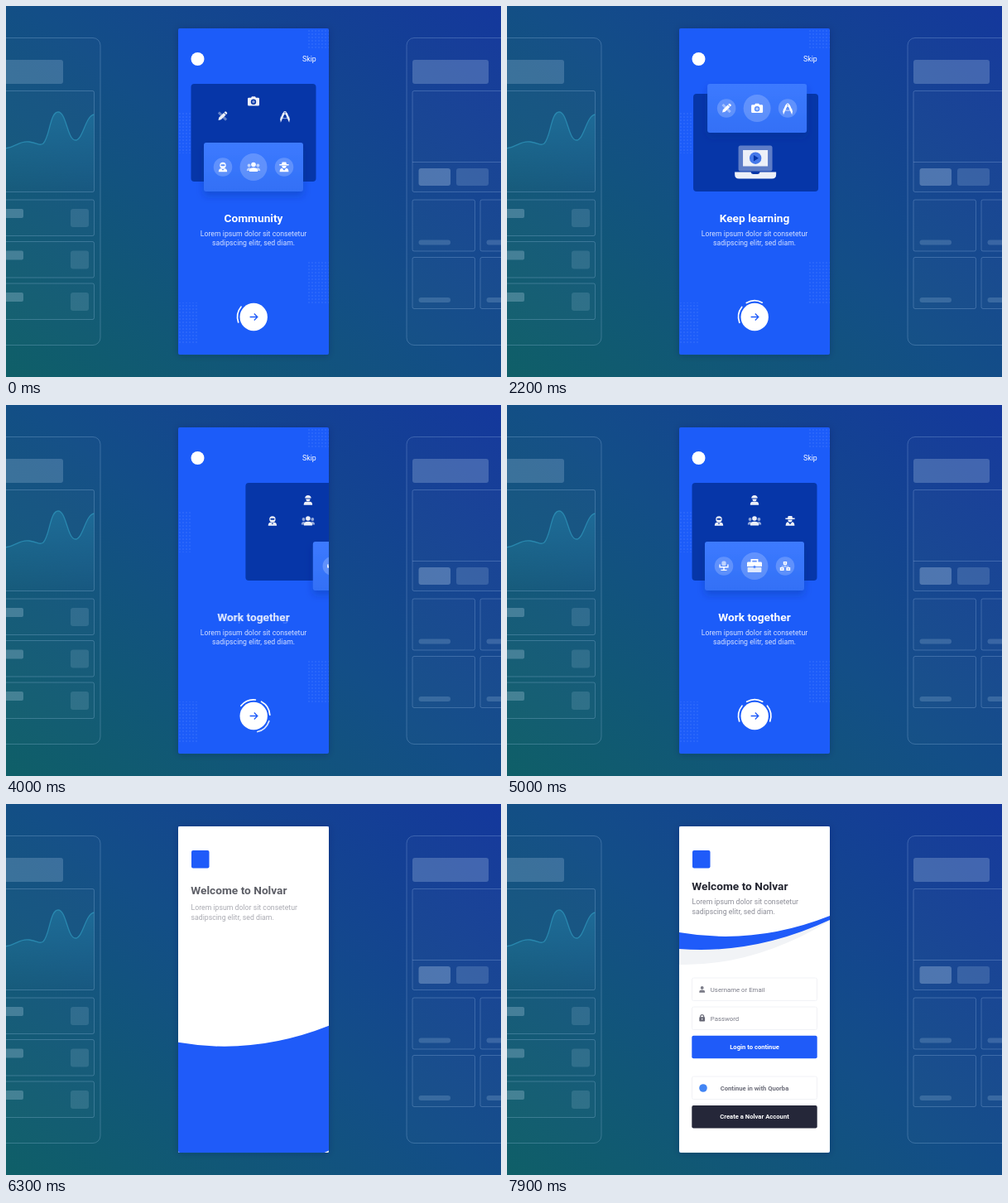
Write an HTML page that moves like this. It is 598 by 448 pixels and loops after 8000 ms.

```html
<!DOCTYPE html>
<html lang="en">
<head>
<meta charset="utf-8">
<title>Onboarding</title>
<style>
  html, body { margin: 0; width: 100%; height: 100%; overflow: hidden; background: #134f86; }
  svg { display: block; width: 598px; height: 448px; font-family: Roboto, sans-serif; }
  .h { font-size: 13.7px; font-weight: 700; }
  .p { font-size: 8.72px; }
  .f { font-size: 7.8px; fill: #7b7c88; }
  .b { font-size: 7.65px; font-weight: 700; }
  .mid { text-anchor: middle; }
  .wire { fill: rgba(255,255,255,.012); stroke: rgba(190,220,255,.23); }
</style>
</head>
<body>
<svg viewBox="0 0 598 448">
  <defs>
    <linearGradient id="bg" gradientUnits="userSpaceOnUse" x1="70" y1="500" x2="528" y2="-52">
      <stop offset="0" stop-color="#0f5f68"/>
      <stop offset=".5" stop-color="#134e87"/>
      <stop offset="1" stop-color="#14389c"/>
    </linearGradient>
    <linearGradient id="area" x1="0" y1="0" x2="0" y2="1">
      <stop offset="0" stop-color="#2ba0c4" stop-opacity=".3"/>
      <stop offset="1" stop-color="#2ba0c4" stop-opacity="0"/>
    </linearGradient>
    <linearGradient id="light" x1="0" y1="0" x2="0" y2="1">
      <stop offset="0" stop-color="#3c7aff"/>
      <stop offset="1" stop-color="#3370f6"/>
    </linearGradient>
    <pattern id="dots" width="4" height="4" patternUnits="userSpaceOnUse">
      <circle cx="2" cy="2" r=".8" fill="#7ea6ff" opacity=".3"/>
    </pattern>
    <filter id="shade" x="-20%" y="-30%" width="140%" height="180%">
      <feDropShadow dx="0" dy="5" stdDeviation="5" flood-color="#0a2c86" flood-opacity=".3"/>
    </filter>
    <filter id="soft" x="-10%" y="-5%" width="120%" height="110%">
      <feDropShadow dx="0" dy="1" stdDeviation="4" flood-color="#04204f" flood-opacity=".25"/>
    </filter>
    <clipPath id="phone"><rect x="208" y="27" width="182" height="394" rx="2"/></clipPath>

    <g id="person">
      <circle cy="-3" r="2.8"/><path d="M-5 5.5V4Q-5 .8 0 .8T5 4V5.5z"/>
    </g>
    <g id="group">
      <g opacity=".6">
        <circle cx="-5.4" cy="-2" r="1.9"/><circle cx="5.4" cy="-2" r="1.9"/>
        <path d="M-8.2 4.4Q-8.2 .8-4.4 .8L-4 4.4zM8.2 4.4Q8.2 .8 4.4 .8L4 4.4z"/>
      </g>
      <use href="#person"/>
    </g>
    <g id="ninja">
      <circle cy="-2" r="3.7"/><path d="M-5.2 5.8Q-5 1.6-2 1.8H2Q5 1.6 5.2 5.8z"/>
      <rect x="-2.5" y="-3.2" width="5" height="1.9" rx=".9" fill="currentColor"/>
      <path d="M-1.3 2.6L0 4.2L1.3 2.6z" fill="currentColor"/>
    </g>
    <g id="spy">
      <path d="M-3-3.4L-2.3-6H2.3L3-3.4H5.6V-2H-5.6V-3.4zM-2.7-1.6H2.7Q2.5 1.4 0 1.4T-2.7-1.6z"/>
      <path d="M-5.4 5.8Q-5.4 1.4-2.4 1.2L0 4.2L2.4 1.2Q5.4 1.4 5.4 5.8z"/>
    </g>
    <g id="worker">
      <path d="M-3.8-2.4Q-3.5-6 0-6T3.8-2.4zM-2.6-1.6H2.6Q2.4 1.3 0 1.3T-2.6-1.6z"/>
      <path d="M-5.2 5.8Q-5.2 2-2.4 1.8H2.4Q5.2 2 5.2 5.8z"/>
    </g>
    <g id="pencil">
      <rect x="-6.5" y="-1.5" width="13" height="3" rx=".6" transform="rotate(45)" opacity=".4"/>
      <path d="M-7 0L-4.3-1.8H4V1.8H-4.3zM4.7-1.8H5.8Q7-1.8 7-.6V.6Q7 1.8 5.8 1.8H4.7z" transform="rotate(-45)"/>
    </g>
    <g id="camera">
      <path d="M-5.6-4.2H-3L-2-5.8H2L3-4.2H5.6Q7-4.2 7-2.9V4.3Q7 5.6 5.6 5.6H-5.6Q-7 5.6-7 4.3V-2.9Q-7-4.2-5.6-4.2z"/>
      <circle cy=".7" r="3.2" fill="currentColor"/><circle cy=".7" r="1.7" opacity=".55"/>
    </g>
    <g id="compass">
      <circle cy="-4" r="2"/>
      <path d="M-.9-3.2L-4.9 5.8L-5.3 3.6L-2.3-3.4zM.9-3.2L4.9 5.8L5.3 3.6L2.3-3.4z" stroke="#fff" stroke-width="1.1"/>
      <path d="M-5.4 1Q0 4.6 5.4 1" fill="none" stroke="#fff" stroke-width="1.1" opacity=".6"/>
      <circle cy="-4" r=".8" fill="currentColor"/>
    </g>
    <g id="chair">
      <rect x="-2.6" y="-6" width="5.2" height="5.6" rx="1.6" opacity=".6"/>
      <path d="M-5.6-2H-4.2V.6H4.2V-2H5.6V2H-5.6zM-.7 2H.7V4.2H3.5V5.6H-3.5V4.2H-.7z"/>
    </g>
    <g id="case">
      <path d="M-3.6-4.6V-7.6H3.6V-4.6" fill="none" stroke="#fff" stroke-width="1.7"/>
      <path d="M-7.6-5H7.6Q9-5 9-3.6V.6H-9V-3.6Q-9-5-7.6-5z"/>
      <path d="M-8.4 1.5H8.4V6.4Q8.4 7.6 7.2 7.6H-7.2Q-8.4 7.6-8.4 6.4z" opacity=".8"/>
      <rect x="-1.4" y="-.4" width="2.8" height="2.8" rx=".6" fill="currentColor"/>
    </g>
    <g id="net">
      <path d="M0-2V1M-4 2V.4H4V2" fill="none" stroke="#fff" opacity=".6"/>
      <rect x="-2.2" y="-5.6" width="4.4" height="4" rx=".6"/>
      <rect x="-6.2" y="1.4" width="4.8" height="4.2" rx=".6"/>
      <rect x="1.4" y="1.4" width="4.8" height="4.2" rx=".6"/>
      <path d="M-.8-3.6H.8M-4.6 3.5H-3M3 3.5H4.6" stroke="currentColor"/>
    </g>
  </defs>

  <rect width="598" height="448" fill="url(#bg)"/>
  <g id="sides"></g>

  <rect x="208" y="27" width="182" height="394" rx="2" fill="#1f5bf9" filter="url(#soft)"/>
  <g clip-path="url(#phone)">
    <g id="intro">
      <path d="M365 27h25v25h-25zM207 128h17v50h-17zM365 308h25v52h-25zM207 358h26v50h-26z" fill="url(#dots)"/>
      <circle cx="231.5" cy="64" r="8" fill="#fff"/>
      <text x="374.8" y="67.2" text-anchor="end" font-size="8.8" fill="#fff">Skip</text>
      <g id="slides"></g>
      <g class="mid" fill="#fff">
        <g id="titles" class="h"></g>
        <g class="p" fill="#d5e0ff">
          <text x="299" y="277.5">Lorem ipsum dolor sit consetetur</text>
          <text x="299" y="289.3">sadipscing elitr, sed diam.</text>
        </g>
      </g>
      <g transform="translate(299.2 375.5)">
        <g id="ring" fill="none" stroke="#fff" stroke-width="1.7" stroke-linecap="round"></g>
        <circle r="16.7" fill="#fff"/>
        <path d="M-4.6 0H4.4M.6-4L4.6 0L.6 4" fill="none" stroke="#1f5bf9" stroke-width="1.3"/>
      </g>
      <circle id="ripple" cx="299.2" cy="375.5" fill="#fff"/>
    </g>

    <g id="login">
      <rect x="207" y="26" width="184" height="396" fill="#fff"/>
      <path id="grey" fill="#f1f3f6"/>
      <path id="blue" fill="#1f5bf9"/>
      <path id="white" fill="#fff"/>
      <g id="mark"><rect x="224" y="56" width="21.5" height="21.5" rx="2" fill="#1f5bf9"/></g>
      <g id="head"><text class="h" x="223.3" y="104.3" fill="#22242f">Welcome to Nolvar</text></g>
      <g id="sub" class="p" fill="#8c8d97">
        <text x="223.5" y="121.2">Lorem ipsum dolor sit consetetur</text>
        <text x="223.5" y="133">sadipscing elitr, sed diam.</text>
      </g>
      <g id="form"></g>
    </g>
  </g>
</svg>
<script>
const $ = id => document.getElementById(id);
const LOOP = 8000, STEP = 100;

// ---- side wireframes
const box = (x, y, w, h, r = 2) => `<rect class="wire" x="${x}" y="${y}" width="${w}" height="${h}" rx="${r}"/>`;
const bar = (x, y, w, h, a, r = 3) => `<rect x="${x}" y="${y}" width="${w}" height="${h}" rx="${r}" fill="#c4dcf2" opacity="${a}"/>`;
const curve = 'M-2 172C12 171 16 162 28 164S40 169 45 166C53 158 53 128 63 128S74 162 84 162C93 162 96 132 106.5 131';
let sides = box(-20, 38.5, 134, 371, 9) + bar(-10, 65, 79, 29, .22) + box(-10, 102.5, 116.5, 122) +
  `<path d="${curve}V224H-2z" fill="url(#area)"/><path d="${curve}" fill="none" stroke="#2c8fb5" stroke-width="1.3" opacity=".85"/>`;
for (const y of [234, 284.5, 335])
  sides += box(-10, y, 116.5, 43.5) + bar(-10, y + 11, 31, 11, .27, 2) + bar(78, y + 11, 22, 22, .15);
sides += box(484, 38.5, 140, 371, 9) + bar(491, 65, 92, 29, .25) + box(491, 102.5, 130, 122) +
  '<path class="wire" d="M491 188.5H600"/>' + bar(498.5, 196, 38.5, 21, .31) + bar(544, 196, 39, 21, .18);
for (const y of [234, 303.5])
  for (const x of [491, 573])
    sides += box(x, y, 75.5, 62) + bar(x + 7.5, y + 48.5, 38.5, 6, .19);
$('sides').innerHTML = sides;

// ---- slides
const icon = (name, x, y, s = 1) => `<use href="#${name}" transform="translate(${x} ${y}) scale(${s})"/>`;
const darkCard = (y, inner) => `<g class="dark" fill="#fff" color="#0636a8">
  <rect x="223.5" y="${y}" width="151" height="118" rx="4" fill="#0636a8"/><g opacity=".93">${inner}</g></g>`;
const lightCard = (y, names) => `<g class="lit" fill="#fff" color="#5a8efc">
  <rect x="239" y="${y}" width="120" height="59" rx="3" fill="url(#light)" filter="url(#shade)"/>` +
  names.map((n, i) => `<circle cx="${262 + 37 * i}" cy="${y + 29.5}" r="${i == 1 ? 16.5 : 11.3}" opacity=".2"/>` +
    icon(n, 262 + 37 * i, y + 29.5)).join('') + '</g>';
const laptop = `<rect x="278" y="168.5" width="41" height="31" rx="2.5" opacity=".38"/>
  <rect x="283.5" y="174" width="30" height="19.5"/><circle cx="298.6" cy="183.7" r="7.2" fill="#4a7dee"/>
  <path d="M296.4 180L302.4 183.7L296.4 187.4z" fill="#0636a8"/>
  <path d="M273.6 200.5H293Q293.6 203 296 203H301Q303.4 203 304 200.5H323.6V203.5Q323.6 208.5 318.6 208.5H278.6Q273.6 208.5 273.6 203.5z"/>`;
const slides = [
  ['Community',
    darkCard(94, icon('pencil', 261.5, 133) + icon('camera', 299, 115) + icon('compass', 337, 133)) +
    lightCard(165, ['ninja', 'group', 'spy'])],
  ['Keep learning', darkCard(106, laptop) + lightCard(94, ['pencil', 'camera', 'compass'])],
  ['Work together',
    darkCard(94, icon('worker', 299, 115) + icon('ninja', 256, 140) + icon('group', 299, 140) + icon('spy', 342, 140)) +
    lightCard(165, ['chair', 'case', 'net'])]
];
$('slides').innerHTML = slides.map(s => `<g>${s[1]}</g>`).join('');
$('titles').innerHTML = slides.map(s => `<text x="299" y="260.6">${s[0]}</text>`).join('');

const polar = (r, deg) => [r * Math.cos(deg * Math.PI / 180), r * Math.sin(deg * Math.PI / 180)].map(v => v.toFixed(2)).join(' ');
$('ring').innerHTML = [190, 270, 350].map(a => `<path d="M${polar(19.6, a - 29)}A19.6 19.6 0 0 1 ${polar(19.6, a + 29)}"/>`).join('');

// ---- login form
const field = (y, inner) => `<g><rect x="223.5" y="${y}" width="151" height="27.5" rx="2" fill="#fff" stroke="#f1f2f6"/>${inner}</g>`;
const button = (y, fill, label) => `<g><rect x="223.3" y="${y}" width="151.4" height="27.5" rx="2" fill="${fill}"/>
  <text class="b mid" x="299" y="${y + 16.4}" fill="#fff">${label}</text></g>`;
$('form').innerHTML =
  field(210, `<g fill="#7b7c88">${icon('person', 235.7, 224, .68)}</g><text class="f" x="245.8" y="226.6">Username or Email</text>`) +
  field(245, `<path d="M233.7 258V256.6A2 2 0 0 1 237.7 256.6V258" fill="none" stroke="#666775" stroke-width="1.1"/>
    <rect x="232.3" y="257.3" width="6.8" height="5.2" rx=".8" fill="#666775"/><circle cx="235.7" cy="259.8" r=".8" fill="#fff"/>
    <text class="f" x="245.8" y="261.6">Password</text>`) +
  button(279.7, '#1f5bf9', 'Login to continue') +
  field(329, `<circle cx="237" cy="343" r="4.8" fill="#4285f4"/><text class="b mid" x="299" y="345.8" fill="#6d6e7a">Continue in with Quorba</text>`) +
  button(364, '#252739', 'Create a Nolvar Account');

// ---- motion
const bez = (x1, x2) => x => {           // y handles at 0 and 1
  let lo = 0, hi = 1, u = x;
  for (let i = 0; i < 20; i++) {
    u = (lo + hi) / 2;
    3 * (1 - u) * u * ((1 - u) * x1 + u * x2) + u ** 3 < x ? lo = u : hi = u;
  }
  return u * u * (3 - 2 * u);
};
const inOut = bez(.42, .58), easeIn = x => x ** 1.7;
const run = (t, start, dur, ease = inOut) => {
  const x = Math.min(1, Math.max(0, (t - start) / dur));
  return x === 0 || x === 1 ? x : ease(x);
};
const TRAVEL = 300;
const TIMES = {
  next: [[1157, 1100], [3257, 1100]],
  ripple: [5300, 560],
  head: [5850, 700],
  white: [5900, 750], blue: [6150, 800], grey: [6400, 600],
  form: [6900, 450]
};
const waves = { white: [155, 171, 135], blue: [175, 182, 140], grey: [194, 196, 141] };

const shift = (el, x, y) => el.setAttribute('transform', `translate(${x.toFixed(2)} ${y.toFixed(2)})`);
const rise = (el, dy, v) => { shift(el, 0, dy * (1 - v)); el.style.opacity = v; };

function draw(t) {
  const [p1, p2] = TIMES.next.map(([s, d]) => run(t, s, d));
  const q1 = p1 ** .7, q2 = p2 ** .7;
  const pos = p1 + p2;
  [...$('slides').children].forEach((g, i) => {
    const x = (i - pos) * TRAVEL;
    g.style.display = Math.abs(x) < TRAVEL ? '' : 'none';
    shift(g.querySelector('.dark'), x, 0);
    shift(g.querySelector('.lit'), x * 2, 0);
  });
  const alpha = [1 - q1, q1 * (1 - q2), q2];
  [...$('titles').children].forEach((el, i) => el.style.opacity = alpha[i]);
  [...$('ring').children].forEach((el, i) => el.style.opacity = [1, q1, q2][i]);
  $('ring').setAttribute('transform', `rotate(${360 * (q1 - q2)})`);

  const [rs, rd] = TIMES.ripple;
  $('ripple').setAttribute('r', 400 * run(t, rs, rd, easeIn));
  const open = t >= TIMES.head[0];
  $('login').style.display = open ? '' : 'none';
  $('intro').style.display = open ? 'none' : '';
  if (!open) return;

  for (const id in waves) {
    const off = 300 * (1 - run(t, ...TIMES[id]));
    const [a, c, b] = waves[id].map(y => y + off);
    $(id).setAttribute('d', `M207 26V${a}H208Q299 ${c} 390 ${b}H391V26z`);
  }
  const v = run(t, ...TIMES.head);
  rise($('mark'), 0, Math.min(1, v * 1.4));
  rise($('head'), 19, v);
  rise($('sub'), 27, v);
  [...$('form').children].forEach((el, i) =>
    rise(el, 14 + 3 * i, run(t, TIMES.form[0] + 40 * i, TIMES.form[1])));
}

const t0 = performance.now();
let last = -1;
function tick() {
  const t = Math.floor((performance.now() - t0) % LOOP / STEP) * STEP;
  if (t !== last) draw(last = t);
  requestAnimationFrame(tick);
}
tick();
</script>
</body>
</html>
```
